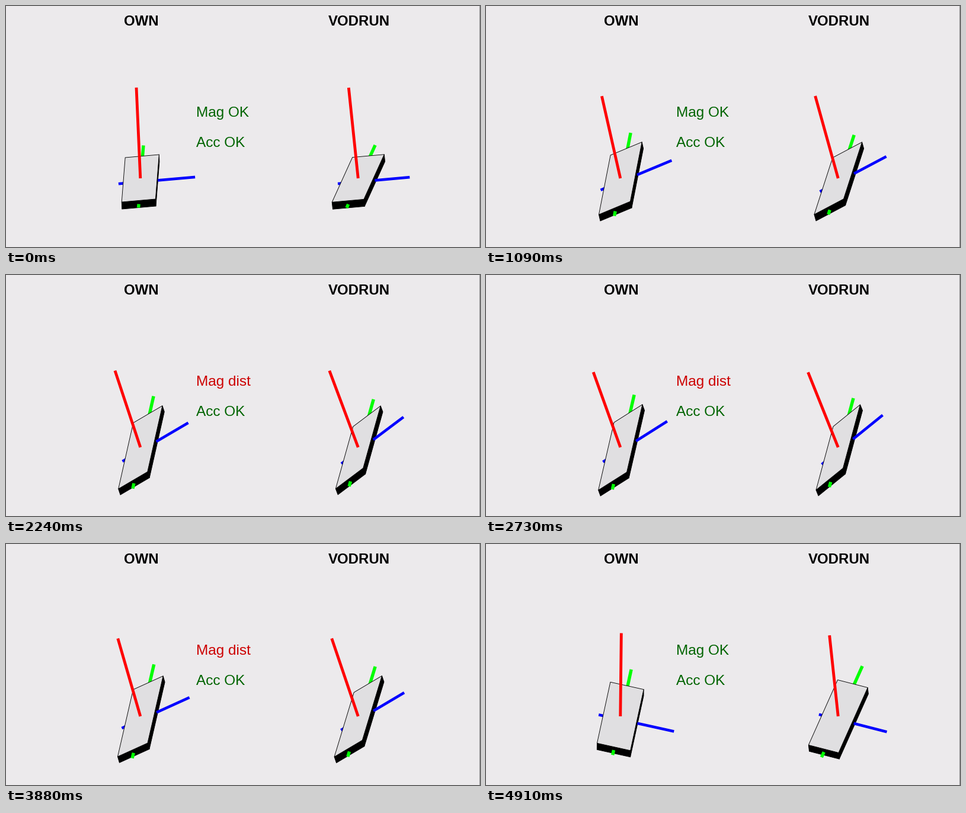
Write a matplotlib script that moves like this. It is 800 px wide and 407 px high and loops after 4940 ms.

```python
import numpy as np
import matplotlib.pyplot as plt
from matplotlib.animation import FuncAnimation
from matplotlib.patches import Polygon, Rectangle

W, H, DPI = 800, 407, 64
PX = 72 / DPI
FRAMES, INTERVAL = 190, 26
LOOP = FRAMES * INTERVAL

# Motion in ms: a quick first tilt, a slow climb to the peak, a swing back.
JOLT_END, PEAK, SWING_END = 480, 3450, 4910
MAG_LOST, MAG_BACK = 1100, 4600

SCALE = np.array([92, 165.5])  # the view is squeezed sideways
HALF_WIDTH, HALF_LENGTH, THICKNESS = 0.312, 0.605, 0.078

GREEN, RED = "#006400", "#cd0000"


def smooth(t, start, end):
    s = np.clip((t - start) / (end - start), 0, 1)
    return s * s * (3 - 2 * s)


def view_axes(pitch, roll, twist):
    """Screen vectors of the device's x, y and z axes, one per row."""
    (sp, sr, st), (cp, cr, ct) = (f([pitch, roll, twist]) for f in (np.sin, np.cos))
    up = np.array([sr * cp, sp, cr * cp])
    level = np.array([cr, 0, -sr])
    right = ct * level + st * np.cross(up, level)
    return np.column_stack([right, -up]) * SCALE


fig = plt.figure(figsize=(W / DPI, H / DPI), dpi=DPI, facecolor="#eceaec")
ax = fig.add_axes([0, 0, 1, 1])
ax.set(xlim=(0, W), ylim=(H, 0))
ax.axis("off")


def label(x, y, text, size, **style):
    return ax.text(x, y, text, fontsize=size * PX, family="Liberation Sans",
                   va="baseline", **style)


class Device:
    """A flat box; angles are (pitch, roll, twist) in degrees."""

    def __init__(self, x, y, start, climb, swing):
        self.center = np.array([x, y])
        self.angles = np.radians([start, climb, swing])
        self.blue_back = self.rod("#0000ff", 4.6, 1)
        self.green_back = self.rod("#00ff00", 5.4, 1)
        self.side = self.panel("black", 2)
        self.front = self.panel("black", 2)
        self.face = self.panel("#e0dfe1", 3)
        self.blue = self.rod("#0000ff", 4.6, 4)
        self.green = self.rod("#00ff00", 5.4, 4)
        self.red = self.rod("#ff0000", 4.8, 5)

    def rod(self, color, width, z):
        return ax.plot([], [], color=color, lw=width * PX, zorder=z,
                       solid_capstyle="butt")[0]

    def panel(self, color, z):
        return ax.add_patch(Polygon(np.zeros((4, 2)), fc=color, ec="black",
                                    lw=0.9 * PX, joinstyle="round", zorder=z))

    def update(self, climb, swing):
        start, rise, back = self.angles
        x, y, z = view_axes(*(start + climb * rise + swing * back))
        u, v, c = HALF_WIDTH * x, HALF_LENGTH * y, self.center
        depth = -THICKNESS * z
        mid = c + depth / 2

        tl, tr, br, bl = c - u + v, c + u + v, c + u - v, c - u - v
        self.face.set_xy([tl, tr, br, bl])
        self.side.set_xy([tr, br, br + depth, tr + depth])
        self.front.set_xy([bl, br, br + depth, bl + depth])

        def span(rod, base, axis, begin, end):
            rod.set_data(*np.array([base + begin * axis, base + end * axis]).T)

        span(self.blue_back, mid, u, -1.3, 0)
        span(self.blue, mid, u, 1.02, 3.22)
        span(self.green_back, mid, v, 0.9, 1.64)
        span(self.green, mid, v, -1.16, -1)
        span(self.red, c, z, 0, 1)


ax.add_patch(Rectangle((799, 0), 1, H, fc="#929193", lw=0))
label(228, 33, "OWN", 24, weight="bold", ha="center")
label(596, 33, "VODRUN", 24, weight="bold", ha="center")
mag = label(320.8, 187, "", 24.4)
label(320.8, 237.5, "Acc OK", 24.4, color=GREEN)
devices = [
    Device(226.8, 291, start=(22, 3, 3.3), climb=(13.3, 18.7, 14), swing=(-4.3, -29.8, -3.7)),
    Device(594.3, 291, start=(22.2, 2.9, 19.5), climb=(10.6, 23, -1.6), swing=(0.5, -34.6, 14)),
]


def draw(i):
    t = i * LOOP / FRAMES
    climb = (0.26 * smooth(t, 0, JOLT_END)
             + 0.74 * np.sin(np.pi / 2 * min(t / PEAK, 1)))
    swing = smooth(t, PEAK, SWING_END)
    for device in devices:
        device.update(climb, swing)
    lost = MAG_LOST <= t < MAG_BACK
    mag.set_text("Mag dist" if lost else "Mag OK")
    mag.set_color(RED if lost else GREEN)
    return []


anim = FuncAnimation(fig, draw, frames=FRAMES, interval=INTERVAL,
                     repeat=True, repeat_delay=0)
plt.show()
```
